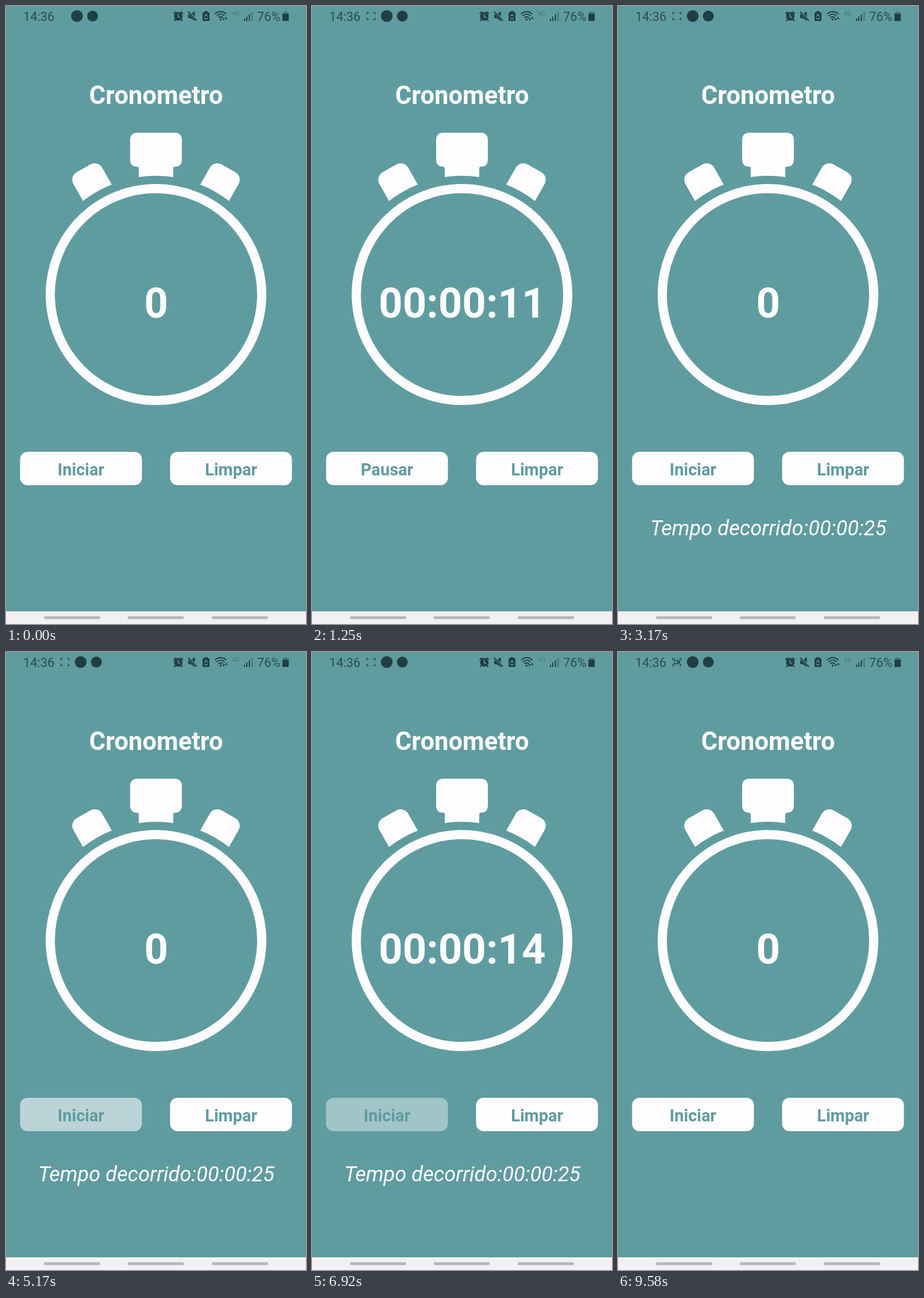
These frames come from a looping animation (522x1073 px, 9.66 s). An HTML page:

```html
<!DOCTYPE html>
<html lang="pt">
<head>
<meta charset="utf-8">
<title>Cronometro</title>
<style>
  html, body { margin: 0; width: 100%; height: 100%; overflow: hidden; background: #5f9ca0; }
  svg { display: block; width: 100%; height: 100%; font-family: Roboto, sans-serif; }
  .bold { font-weight: 700; text-anchor: middle; }
  .label { font-size: 29px; fill: #5f9ca0; }
  .status { font-size: 21.75px; fill: #2b4d50; }
  .line { fill: none; stroke: #203f42; stroke-width: 1.7; }
</style>
</head>
<body>
<svg viewBox="0 0 522 1073">
  <defs>
    <path id="knob" d="M134 338.5L117.5 309.5A15 15 0 0 1 123 288.5L147 275A15 15 0 0 1 167.5 281L184 310A207 207 0 0 0 134 338.5Z"/>
  </defs>
  <rect width="522" height="1073" fill="#5f9ca0"/>

  <g fill="#203f42">
    <text class="status" x="30" y="25.5">14:36</text>
    <g id="recorder">
      <path class="line" style="stroke-width:1.4" d="M95.5 14.5V11.5H98.5M106.5 11.5H109.5V14.5M109.5 20.5V23.5H106.5M98.5 23.5H95.5V20.5"/>
      <path id="camera" class="line" style="stroke-width:1.3" d="M98.5 14.5H104V20.5H98.5ZM104 17.5L107 15V20Z"/>
    </g>
    <g id="badges">
      <circle cx="130" cy="17.5" r="10.2"/>
      <circle cx="157.2" cy="17.5" r="9.4"/>
    </g>

    <circle cx="299.8" cy="18" r="7.4"/>
    <path class="line" style="stroke-width:2.2" d="M291.5 13.5L296 9.8M303.6 9.8L308 13.5M295 23.5L292.8 26M304.6 23.5L306.8 26"/>
    <path class="line" style="stroke:#5f9ca0;stroke-width:1.6" d="M299.5 13.5V18.5L303 20.5"/>

    <path d="M317 14.5H321L328.5 9V26L321 21H317Z"/>
    <path class="line" style="stroke:#5f9ca0;stroke-width:4" d="M317 9.5L333 26"/>
    <path class="line" style="stroke-width:2" d="M317 10L332 25.5"/>

    <path d="M345 9H351V11H353Q354 11 354 12V25Q354 26 353 26H343Q342 26 342 25V12Q342 11 343 11H345Z"/>
    <path class="line" style="stroke:#5f9ca0;stroke-width:1.4" d="M345.5 18L348 14.5L350.5 18M351 20L349.5 22.5H346.5L345 20"/>

    <path class="line" d="M363.5 14Q373.5 5.5 383.5 14M366.5 17.3Q373.5 11 380.5 17.3M369.5 20.5Q373.5 17 377.5 20.5"/>
    <circle cx="373.5" cy="23.5" r="1.8"/>
    <path d="M376.5 21.5H381L378.8 25.5ZM381 22.5H385.5L383.2 18.5Z"/>
    <text x="393" y="17" font-size="10.5" fill="#477a7e">4G</text>
    <path d="M414 22H416V26H414ZM418 18.5H420V26H418ZM422.5 14.5H424.5V26H422.5Z"/>
    <path fill="#477a7e" d="M427 10H429.5V26H427Z"/>
    <text class="status" x="437" y="25.5">76%</text>
    <path fill="#477a7e" d="M484 9H489V11H492V14H481V11H484Z"/>
    <path d="M481 13.5H492V25Q492 26 491 26H482Q481 26 481 25Z"/>
  </g>

  <g fill="#fffdff">
    <text class="bold" x="261.2" y="169.5" font-size="43.5">Cronometro</text>
    <path d="M229 220H293Q306 220 306 233V266Q306 279 294 279Q291 279 291 282V297A207 207 0 0 0 231 297V282Q231 279 228 279Q216 279 216 266V233Q216 220 229 220Z"/>
    <use href="#knob"/>
    <use href="#knob" transform="translate(522 0) scale(-1 1)"/>
    <circle cx="261" cy="501" r="184" fill="none" stroke="#fffdff" stroke-width="16"/>
    <text id="counter" class="bold" x="261.3" y="541" font-size="72.5">0</text>
    <g id="toggle">
      <rect x="24.5" y="774" width="212" height="58" rx="13"/>
      <text id="toggleLabel" class="bold label" x="130.5" y="815">Iniciar</text>
    </g>
    <g id="clear">
      <rect x="285.5" y="774" width="212" height="58" rx="13"/>
      <text class="bold label" x="391.7" y="815">Limpar</text>
    </g>
    <text id="elapsed" x="261.5" y="918.5" font-size="36.25" font-style="italic" text-anchor="middle"></text>
  </g>

  <rect y="1051" width="522" height="22" fill="#f2f0f2"/>
  <g fill="#b8b6b8">
    <rect x="66" y="1059.5" width="98" height="5" rx="2.5"/>
    <rect x="211.5" y="1059.5" width="98" height="5" rx="2.5"/>
    <rect x="358" y="1059.5" width="98" height="5" rx="2.5"/>
  </g>
</svg>
<script>
const LOOP = 9660;
const STEP = 1000 / 12;
const byId = id => document.getElementById(id);
const [recorder, camera, badges, counter, toggle, toggleLabel, clear, elapsed] =
  ['recorder', 'camera', 'badges', 'counter', 'toggle', 'toggleLabel', 'clear', 'elapsed'].map(byId);

// Touches: finger down, finger up (ms)
const togglePresses = [[10, 107], [5090, 5370], [6700, 6830]];
const clearPresses = [[2590, 2690], [7340, 7425], [8340, 8420]];

// Counting runs: started, stopped, cleared, tick length
const runs = [
  { start: 107, stop: 2690, clear: 2690, tick: 99.7 },
  { start: 5370, stop: 6830, clear: 7425, tick: 100 }
];

const clamp = x => Math.min(1, Math.max(0, x));
const ease = x => x < .5 ? 2 * x * x : 1 - 2 * (1 - x) ** 2;
const clock = n => '00:00:' + String(n).padStart(2, '0');
const countAt = (run, t) => Math.floor((Math.min(t, run.stop) - run.start) / run.tick);

function pressOpacity(presses, t) {
  let opacity = 1;
  for (const [down, up] of presses) {
    const dim = .8 * ease(clamp((Math.min(t, up) - down) / 150));
    opacity -= dim * (1 - ease(clamp((t - up) / 250)));
  }
  return opacity;
}

function setText(node, text) {
  if (node.textContent !== text) node.textContent = text;
}

function render(time) {
  const t = Math.floor((time + 5) / STEP) * STEP;

  const run = runs.find(r => t >= r.start && t < r.clear);
  const count = run ? countAt(run, t) : 0;
  setText(counter, count > 0 ? clock(count) : '0');
  setText(toggleLabel, run && t < run.stop ? 'Pausar' : 'Iniciar');

  const last = runs.filter(r => t >= r.clear).pop();
  const showElapsed = last && t < clearPresses[2][1];
  setText(elapsed, showElapsed ? 'Tempo decorrido:' + clock(countAt(last, last.stop)) : '');

  toggle.setAttribute('opacity', pressOpacity(togglePresses, t));
  clear.setAttribute('opacity', pressOpacity(clearPresses, t));

  const arrive = clamp(t / 250);
  recorder.setAttribute('opacity', .04 + .96 * arrive);
  badges.setAttribute('transform', `translate(${-6.5 * (1 - arrive) ** 2} 0)`);
  const blinkOn = t >= 415 && Math.floor((t - 415) / 500) % 2 === 0;
  camera.setAttribute('opacity', blinkOn ? 1 : 0);
}

const begin = performance.now();
function loop() {
  render((performance.now() - begin) % LOOP);
  requestAnimationFrame(loop);
}
render(0);
requestAnimationFrame(loop);
</script>
</body>
</html>
```
